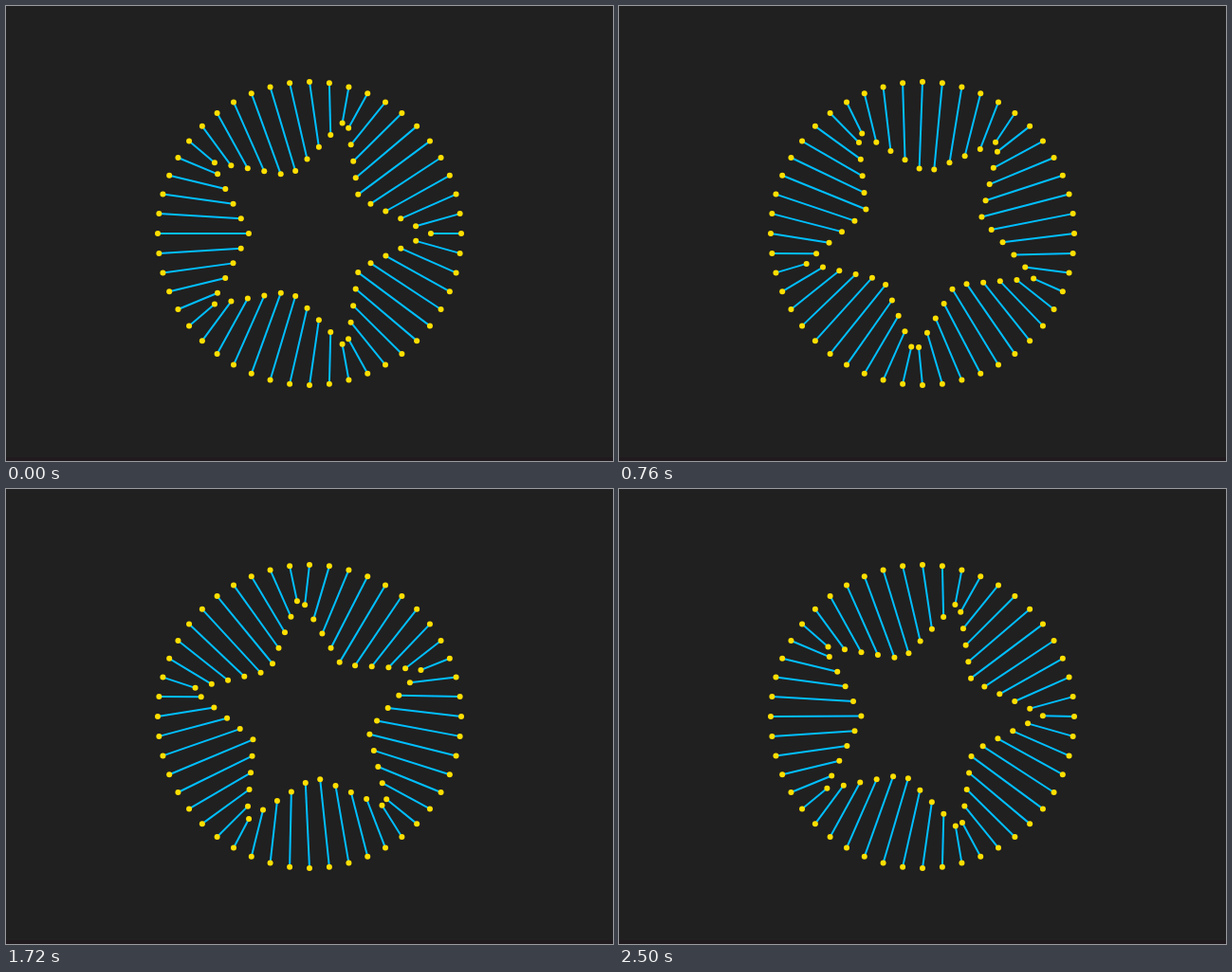
Write an HTML page with a canvas that moves like this. It is 640 px wide and 480 px high and loops after 2520 ms.

```html
<!DOCTYPE html>
<html>
<head>
<meta charset="utf-8">
<style>
  html, body { margin: 0; height: 100%; overflow: hidden; background: #202020; }
  canvas { display: block; }
</style>
</head>
<body>
<canvas id="stage" width="640" height="480"></canvas>
<script>
const ctx = document.getElementById('stage').getContext('2d');
const LOOP = 2520, COUNT = 48, TAU = Math.PI * 2, EDGE = TAU / 10;

const polar = (radius, angle) => [radius * Math.cos(angle), radius * Math.sin(angle)];

// Corners alternate between tips and notches, starting with a tip.
const corner = (i, turn) => polar(i % 2 ? 64 : 128, i * EDGE + turn);

function starPoint(angle, turn) {
  const u = (angle - turn) / EDGE, i = Math.floor(u), f = u - i;
  const [ax, ay] = corner(i, turn), [bx, by] = corner(i + 1, turn);
  return [ax + (bx - ax) * f, ay + (by - ay) * f];
}

function dot([x, y]) {
  ctx.beginPath();
  ctx.arc(x, y, 3, 0, TAU);
  ctx.fill();
}

function draw(now) {
  const turn = (now % LOOP) / LOOP * TAU / 5;
  ctx.setTransform(1, 0, 0, 1, 0, 0);
  ctx.fillStyle = '#202020';
  ctx.fillRect(0, 0, 640, 480);
  ctx.fillStyle = '#201a1e';
  ctx.fillRect(0, 476, 640, 4);

  ctx.translate(320, 240);
  ctx.strokeStyle = '#00bfff';
  ctx.fillStyle = '#ffdf00';
  ctx.lineWidth = 2;
  for (let k = 0; k < COUNT; k++) {
    const angle = k / COUNT * TAU;
    const outer = polar(160, angle), inner = starPoint(angle, turn);
    ctx.beginPath();
    ctx.moveTo(...outer);
    ctx.lineTo(...inner);
    ctx.stroke();
    dot(outer);
    dot(inner);
  }
}

const start = performance.now();
function tick() {
  draw(performance.now() - start);
  requestAnimationFrame(tick);
}
tick();
</script>
</body>
</html>
```
